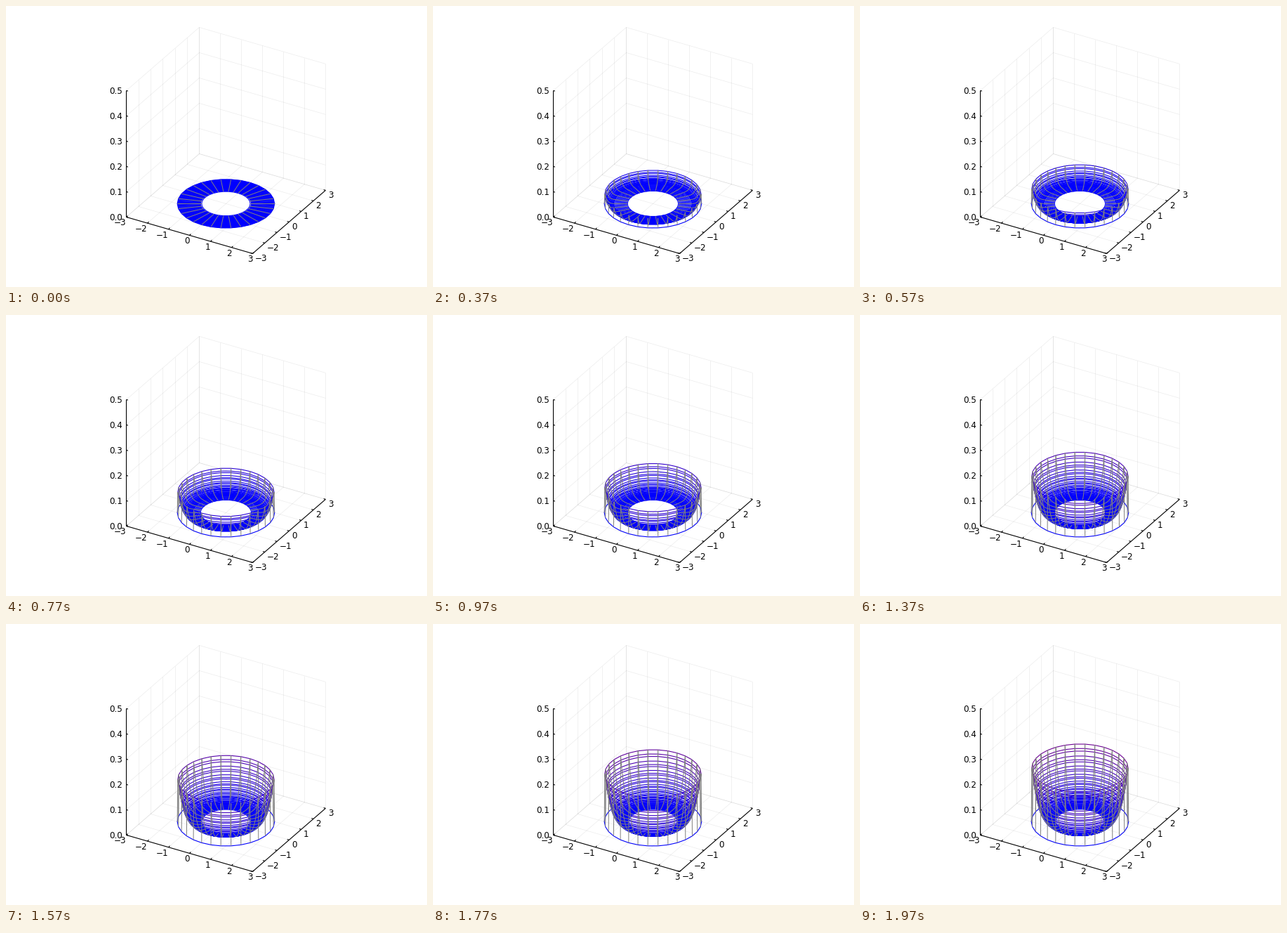
Animation, 600 px wide and 400 px high, one loop 2.01 s. Source, as a matplotlib script:

```python
import math

import numpy as np
import matplotlib.pyplot as plt
from matplotlib.animation import FuncAnimation
from matplotlib.collections import LineCollection

W, H, DPI = 600, 400, 100
PX = 72 / DPI
FRAMES, LOOP_MS = 60, 2010

CX, CY = 313.45, 281.4         # floor centre on the stage
SCALE = 60 / math.sqrt(3)      # pixels per unit in the ground plane
Z_SCALE = 360                  # pixels per unit of height

RATE = 0.0039                  # boundary growth per step
DIFF = 0.00138                 # diffusion per step
CELL, CELLS, SPOKES = 0.06, 16, 30
TINY = 2e-4


def project(x, y, z):
    """Orthographic view, azimuth 30 and elevation 30 degrees."""
    c, s = math.cos(math.pi / 6), math.sin(math.pi / 6)
    px = CX + SCALE * (c * x + s * y)
    py = CY + SCALE * s * (s * x - c * y) - Z_SCALE * z
    return np.stack(np.broadcast_arrays(px, py), axis=-1)


# Each radial cell holds one single ring and one close pair.
nodes = np.array([0.0175, 0.0385, 0.0515])
inner = 2 - (CELL * np.arange(CELLS)[:, None] + nodes).ravel()
radius = np.concatenate([[2], inner, [1]])
single = np.concatenate([[False], np.tile([True, False, False], CELLS), [True]])
theta = (np.arange(SPOKES + 1) + 0.5) * 2 * math.pi / SPOKES
X = radius[:, None] * np.cos(theta)
Y = radius[:, None] * np.sin(theta)
erfc = np.vectorize(math.erfc)


def height(k):
    """Diffusion inward from an edge that rises linearly in time."""
    if k == 0:
        return np.zeros_like(radius)
    q = (2 - radius) / (2 * math.sqrt(DIFF * k))
    shape = (1 + 2 * q**2) * erfc(q) - 2 / math.sqrt(math.pi) * q * np.exp(-q**2)
    z = RATE * k * np.maximum(shape, 0) * np.sqrt(2 / radius)
    z[0] = 0
    return z


fig = plt.figure(figsize=(W / DPI, H / DPI), dpi=DPI, facecolor="white")
ax = fig.add_axes([0, 0, 1, 1])
ax.set_xlim(0, W)
ax.set_ylim(H, 0)
ax.axis("off")


def line(a, b, **style):
    p = np.array([project(*a), project(*b)])
    ax.plot(p[:, 0], p[:, 1], solid_capstyle="butt", **style)


def label(text, x, y, ha):
    ax.text(x, y, text.replace("-", "\u2212"), ha=ha, va="center_baseline",
            family="DejaVu Sans", size=12 * PX, color="black")


GRID = dict(color="black", alpha=0.07, lw=0.75 * PX, zorder=1)
AXIS = dict(color="black", lw=1.1 * PX, zorder=2)

for v in range(-3, 4):
    line((v, -3, 0), (v, 3, 0), **GRID)
    line((v, 3, 0), (v, 3, 0.5), **GRID)
    line((-3, v, 0), (3, v, 0), **GRID)
    line((-3, v, 0), (-3, v, 0.5), **GRID)
    line((v, -3, 0), (v, -2.88, 0), **AXIS)
    line((3, v, 0), (2.91, v, 0), **AXIS)
    x, y = project(v, -3, 0)
    label(str(v), x - 0.1, y + 6.9, "right")
    x, y = project(3, v, 0)
    label(str(v), x + 3.4, y + 5.4, "left")

for i in range(6):
    z = i / 10
    line((-3, -3, z), (-3, 3, z), **GRID)
    line((-3, 3, z), (3, 3, z), **GRID)
    line((-3, -3, z), (-2.92, -3, z), **AXIS)
    x, y = project(-3, -3, z)
    label(f"{z:.1f}", x - 5.3, y - 0.1, "right")

line((-3, -3, 0), (-3, -3, 0.5), **AXIS)
line((-3, -3, 0), (3, -3, 0), **AXIS)
line((3, -3, 0), (3, 3, 0), **AXIS)

rings = LineCollection([], linewidths=1.1 * PX, zorder=3)
spokes = LineCollection([], colors="#808080", linewidths=PX, zorder=4)
ax.add_collection(rings, autolim=False)
ax.add_collection(spokes, autolim=False)


def draw(k):
    z = height(k)
    pts = project(X, Y, z[:, None])
    # Undershoot ahead of the front hides the single rings.
    shown = (z > TINY) | ~single | (k == 0)
    heat = np.clip(z / 0.5, 0, 1)
    colors = np.stack([heat, 0 * heat, 1 - heat], axis=1)
    rings.set_segments(list(pts[shown]))
    rings.set_color(colors[shown])
    spokes.set_segments([pts[shown, j] for j in range(SPOKES)])
    return rings, spokes


anim = FuncAnimation(fig, draw, frames=FRAMES, interval=LOOP_MS / FRAMES,
                     repeat=True, repeat_delay=0, blit=False)
plt.show()
```
